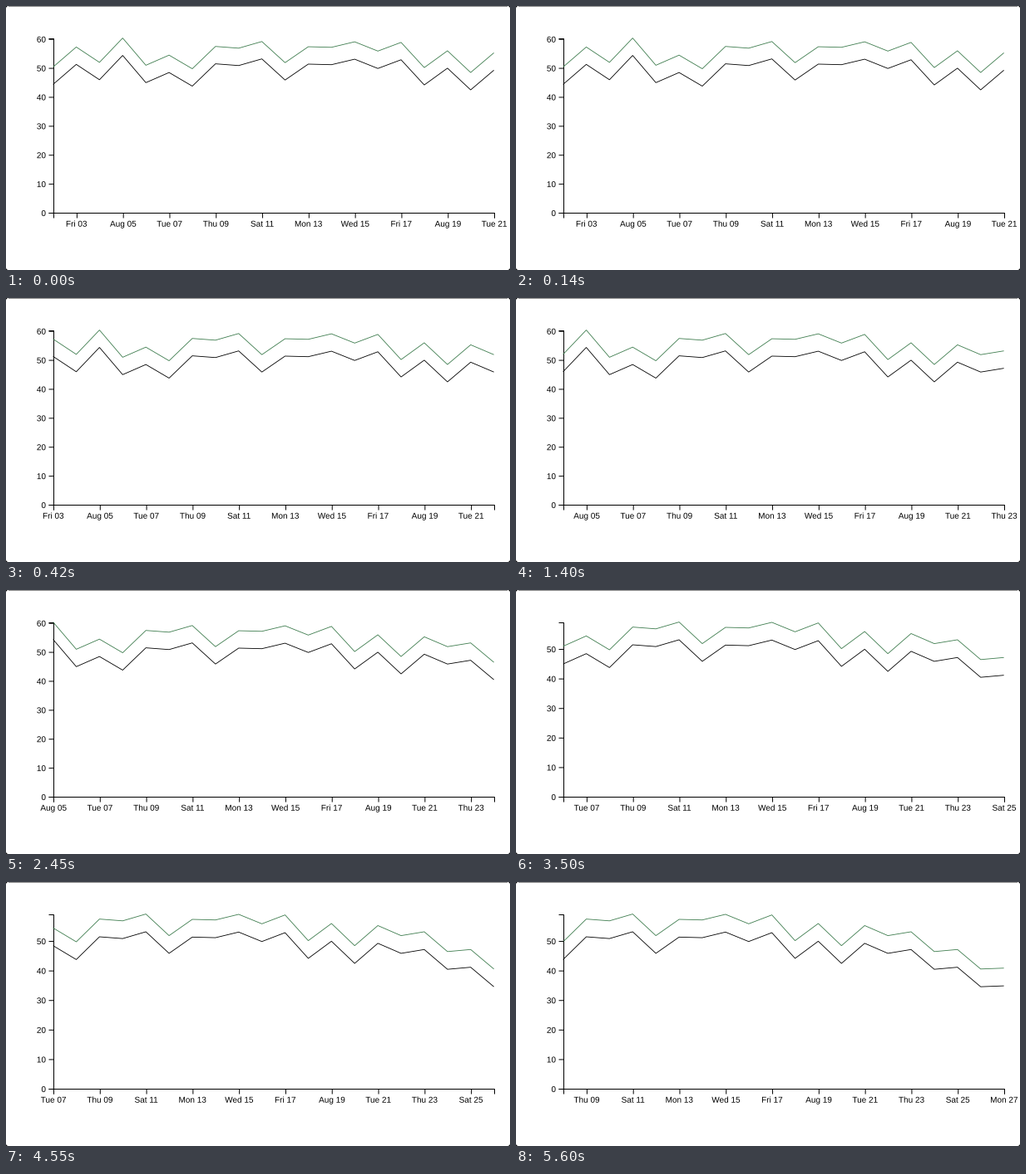
Recreate the animation shown at these times as a matplotlib script. Size 606x318 px, loop 5880 ms.

```python
import matplotlib.pyplot as plt
from matplotlib.animation import ArtistAnimation
from matplotlib.patches import FancyBboxPatch, PathPatch
from matplotlib.textpath import TextPath
from matplotlib.transforms import Affine2D

W, H, DPI = 606, 318, 100
PX = 72 / DPI                      # points per pixel
STEP, LOOP = 70, 5880              # ms
PERIOD, LEAD = 1050, 700           # a new day arrives every PERIOD ms
LEFT, BOTTOM, PLOT_W, PLOT_H = 57, 249, 530, 210
POINTS, FIRST_DAY, GAP, TICK = 20, 2, 6, 6
NUDGE = 0.4                        # curves sit slightly up and left of the axes
GREEN = "#3f7d4f"
WEEK = ["Aug", "Mon", "Tue", "Wed", "Thu", "Fri", "Sat"]  # Sundays show the month

# upper series, one value per day
VALUES = [50.2, 57.1, 51.8, 60.2, 50.8, 54.3, 49.6, 57.3, 56.7, 59.0,
          51.7, 57.2, 57.0, 58.9, 55.7, 58.7, 50.0, 55.8, 48.3, 55.1,
          51.7, 53.0, 46.3, 47.0, 40.4, 40.7]

plt.rcParams["font.family"] = "Liberation Sans"

fig = plt.figure(figsize=(W / DPI, H / DPI), dpi=DPI, facecolor="black")
ax = fig.add_axes([0, 0, 1, 1])
ax.set_xlim(0, W)
ax.set_ylim(H, 0)
ax.axis("off")


def line(xs, ys, color="black", width=1.0, snap=False):
    return ax.plot(xs, ys, color=color, lw=width * PX, snap=snap,
                   solid_capstyle="butt", solid_joinstyle="miter")[0]


def label(x, baseline, text, align):
    """Text as outlines, so that it can sit between whole pixels."""
    path = TextPath((0, 0), text, size=10)
    box = path.get_extents()
    anchor = box.x1 if align == "right" else (box.x0 + box.x1) / 2
    place = Affine2D().translate(-anchor, 0).scale(1, -1).translate(x, baseline)
    return ax.add_patch(PathPatch(place.transform_path(path), fc="black",
                                  lw=0, snap=False, zorder=3))


def draw_backdrop():
    ax.add_patch(FancyBboxPatch((0, 0), W, H, fc="white", ec="none",
                                boxstyle="round,pad=0,rounding_size=3"))
    line([3, W - 3], [0.5, 0.5], "#8a8a8a")


def draw_axes():
    x0, x1 = LEFT + 0.5, LEFT + PLOT_W + 0.5
    y0, y1 = BOTTOM + 0.5, BOTTOM - PLOT_H + 0.5
    line([x0, x0, x1, x1], [y0 + TICK, y0, y0, y0 + TICK])
    line([x0 - TICK, x0, x0, x0 - TICK], [y0, y0, y1, y1])


def draw_window(shift):
    """Everything that depends on the first visible day."""
    values = VALUES[shift:shift + POINTS]
    top = max(values)
    xs = [LEFT + i * PLOT_W / (POINTS - 1) for i in range(POINTS)]

    def y_of(value):
        return BOTTOM - value * PLOT_H / top

    def curve(offset, color):
        return line([x - NUDGE for x in xs],
                    [y_of(v + offset) - NUDGE for v in values], color, 0.85)

    artists = [curve(-GAP, "black"), curve(0, GREEN)]

    for i, x in enumerate(xs):
        day = FIRST_DAY + shift + i
        if day % 2:
            y = BOTTOM + 0.5
            artists.append(line([x + 0.5, x + 0.5], [y, y + TICK]))
            name = f"{WEEK[(day - 5) % 7]} {day:02d}"
            artists.append(label(x, BOTTOM + 16.7, name, "center"))

    for value in range(0, int(top) + 1, 10):
        x, y = LEFT + 0.5, y_of(value)
        artists.append(line([x - TICK, x], [y + 0.5, y + 0.5]))
        artists.append(label(LEFT - 9.4, y + 4, str(value), "right"))
    return artists


draw_backdrop()
draw_axes()
windows = [draw_window(s) for s in range(len(VALUES) - POINTS + 1)]
frames = [windows[(t + LEAD) // PERIOD] for t in range(0, LOOP, STEP)]
anim = ArtistAnimation(fig, frames, interval=STEP, repeat=True, repeat_delay=0)
plt.show()
```
